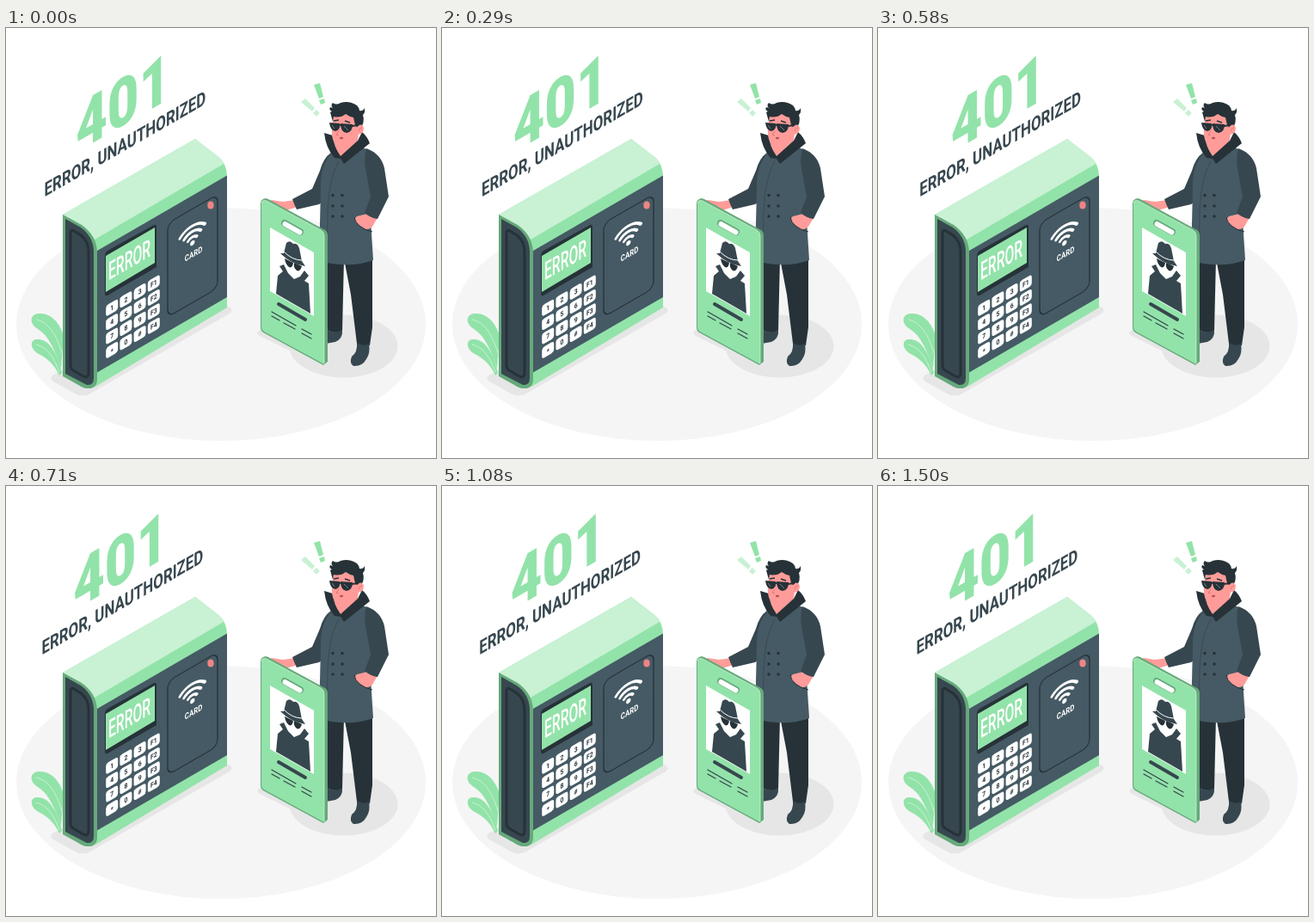
An HTML page with a canvas for the animation above (1.54 s loop, 500 px wide and 500 px high).

```html
<!DOCTYPE html>
<html lang="en">
<head>
<meta charset="utf-8">
<title>401</title>
<style>
html, body { margin: 0; width: 100%; height: 100%; overflow: hidden; background: #fff; }
canvas { display: block; width: 100vw; height: 100vh; }
</style>
</head>
<body>
<canvas id="stage" width="500" height="500"></canvas>
<script>
const ctx = document.getElementById('stage').getContext('2d');
const GREEN = '#92e3a9', PALE = '#c9f1d4', DEEP = '#66a97b';
const INK = '#263238', SLATE = '#37474f', COAT = '#455a64', SKIN = '#ff9c99', SHADE = '#e6e6e6';
const ISO = Math.tan(Math.PI / 6);
const LOOP = 1540, STEPS = 37;

// Horizontal shake offsets at every tenth of the cycle
const SHAKE = [0, -1, 2, -4, 4, -4, 4, -4, 2, -1, 0];

function fill(color, d) {
  ctx.fillStyle = color;
  ctx.fill(new Path2D(d));
}

function line(color, width, d) {
  ctx.strokeStyle = color;
  ctx.lineWidth = width;
  ctx.stroke(new Path2D(d));
}

function ellipse(color, x, y, rx, ry = rx, turn = 0) {
  ctx.fillStyle = color;
  ctx.beginPath();
  ctx.ellipse(x, y, rx, ry, turn, 0, Math.PI * 2);
  ctx.fill();
}

// Draws in an isometric wall plane whose origin is (x, y)
function onWall(x, y, squeeze, draw) {
  ctx.save();
  ctx.transform(squeeze, -squeeze * ISO, 0, 1, x, y);
  draw();
  ctx.restore();
}

function wallText(text, x, y, squeeze, weight, size, color, align = 'left') {
  onWall(x, y, squeeze, () => {
    ctx.font = `${weight} ${size}px Roboto, sans-serif`;
    ctx.textAlign = align;
    ctx.fillStyle = color;
    ctx.fillText(text, 0, 0);
  });
}

function roundBox(x, y, w, h, r) {
  ctx.beginPath();
  ctx.roundRect(x, y, w, h, r);
}

function drawFloor() {
  ellipse('#f5f5f5', 250, 344.5, 238, 135.5);
  ellipse(SHADE, 392.5, 370, 63, 36.5);
  fill(SHADE, 'M54 404Q50 408 55 411L80 425Q89 430 98 425L260 332Q265 328 260 325L230 310Z');
  fill(SHADE, 'M294 352Q290 355 295 358L366 393L374 389L300 350Z');
}

function drawLeaves() {
  fill(GREEN, 'M64 396C57 375 50 358 37 350C27 344 27 333 38 332C53 331 63 344 67 358Z');
  line(PALE, 1, 'M35 339C49 342 58 355 65 378');
  fill(GREEN, 'M62 404C56 391 48 384 38 379C28 374 27 362 36 362C50 361 60 378 65 401Z');
  line(PALE, 1, 'M35 368C48 371 56 383 62 400');
}

function drawKeypad() {
  const rows = [['1', '2', '3', 'F1'], ['4', '5', '6', 'F2'], ['7', '8', '9', 'F3'], ['*', '0', '#', 'F4']];
  rows.forEach((keys, row) => keys.forEach((key, col) => {
    const x = 123.2 + col * 16.2, y = 325.2 - col * 9.4 + row * 16.4;
    onWall(x, y, 1, () => {
      ctx.fillStyle = '#fff';
      roundBox(-7, -6.5, 14, 13, 3);
      ctx.fill();
    });
    wallText(key, x, y + (key === '*' ? 4.2 : 2.8), .85, 700, 8, INK, 'center');
  }));
}

function drawReader() {
  // shell
  fill(GREEN, 'M66 217L220 129L248 151Q257 158 257 174V325L104 417L92 419Z');
  fill(PALE, 'M66 217L220 129L245 148Q251 152 253 158L103 246Q98 237 90 232Z');
  fill(COAT, 'M106 259L257 171.5V313L106 400.5Z');
  // end cap
  fill(DEEP, 'M66 217L88 229Q105 241 106 260V408Q106 420 94 419Q90 419 84 415L66 405Z');
  fill(SLATE, 'M69 222L87 232Q101 242 102 259V407Q102 416 94 415L69 402Z');
  line(INK, 3, 'M75 238Q75 234 79 236L87 241Q96 248 96 260V400Q96 408 90 405L78 398Q75 396 75 392Z');
  // display
  fill(INK, 'M115 264Q115 261 118 259L172 229Q175 228 175 231V278L118 311Q115 312 115 309Z');
  fill(GREEN, 'M116 265L173 232V273L116 307Z');
  wallText('ERROR', 119, 293.5, .54, 500, 29, '#fff');
  drawKeypad();
  // card area
  onWall(188, 227, 1, () => {
    ctx.strokeStyle = INK;
    ctx.lineWidth = 1.3;
    roundBox(0, 0, 58, 109, 8);
    ctx.stroke();
  });
  ellipse('#ed8583', 238, 206, 3.7, 4.5);
  onWall(216.8, 248, 1, () => {
    ctx.strokeStyle = '#fff';
    ctx.lineWidth = 3.4;
    ctx.lineCap = 'round';
    for (const r of [7, 13.5, 20]) {
      ctx.beginPath();
      ctx.arc(0, 2, r, -Math.PI * .76, -Math.PI * .24);
      ctx.stroke();
    }
    ellipse('#fff', 0, 2, 2.7);
  });
  wallText('CARD', 218, 266, .78, 700, 10, '#fff', 'center');
}

function drawMan() {
  // legs and shoes
  fill(INK, 'M372 268H393L391 352Q382 357 373 351Z');
  fill(SLATE, 'M373 351Q382 356 391 351Q392 361 383 365L372 367Z');
  fill(INK, 'M393 268H426V348L423 369Q414 374 408 367L401 310Z');
  fill(SLATE, 'M408 366Q415 371 422 367Q424 378 419 385Q414 394 404 393Q399 390 402 382Q409 377 408 366Z');
  // far arm and hand
  fill(SKIN, 'M337 200L322 202L309 200Q305 201 309 205L318 212L326 212L339 208Z');
  fill(SLATE, 'M378 145Q369 151 365 166L356 187L333 199Q335 205 338 211L364 205Q374 200 378 185Z');
  // coat
  fill(COAT, 'M379 145L410 137L422 142Q430 151 426 176L423 207L427 270Q400 280 364 271L366 185Q365 161 379 145Z');
  line(SLATE, .8, 'M387 155Q375 175 374 215L373 272');
  // near arm
  fill(SKIN, 'M420 216L408 219Q404 222 407 226L414 232Q421 237 426 231L433 219Z');
  fill(SLATE, 'M419 140Q436 146 440 163L445 196L432 222Q424 221 417 215L424 196L420 174Q415 154 419 140Z');
  line(INK, 1, 'M405 220Q407 232 426 237');
  for (const y of [194.5, 207, 219]) {
    ellipse(INK, 380, y, 1.7);
    ellipse(INK, 391, y, 1.7);
  }
  // neck and collar
  fill(SKIN, 'M380 125L411 116L408 137L390 152L383 140Z');
  fill(INK, 'M370 122L380 125Q381 138 389 149L409 131L414 121Q420 126 423 134L393 158L389 152L382 151Q372 140 370 122Z');
  // head
  fill(SKIN, 'M381 102Q392 94 408 101L411 117Q407 126 397 131Q388 136 382 133Q378 129 379 114Z');
  fill(INK, 'M380 109L377 98L379 97Q375 95 377 92L380 93Q377 90 380 87Q384 90 389 87Q399 84 408 90Q411 93 411 96Q415 97 417 93Q418 98 415 101Q418 110 411 118L406 113L404 104Q399 103 395 100Q389 105 381 103Z');
  ellipse(SKIN, 411.5, 118, 4.3, 5.6, .35);
  line('#df706f', .8, 'M410 120Q411 116 414 116');
  line(INK, 1.5, 'M381 108L387 107M394 108L400 110');
  line(INK, 2.2, 'M378 112L402 114L410 113');
  fill(INK, 'M376 110L388 111Q389 119 383 120Q377 119 376 110ZM389 111L403 112Q403 121 396 122Q389 121 389 111Z');
  line('#718088', 1, 'M379 113L382 117M393 114L398 119');
  line('#df706f', .9, 'M387 120L384 124L387 125');
  ellipse('#b34e52', 390, 128, 2, 1.2);
}

function drawPass() {
  fill(DEEP, 'M296 204Q296 199 302 198L305 199L371 235Q374 237 374 241V388L369 392L299 354Q296 352 296 348Z');
  fill(GREEN, 'M297 204Q297 199 303 201L366 235Q370 237 370 242V391L300 353Q297 351 297 347Z');
  line(PALE, .8, 'M297 204Q298 199 303 201L366 235Q370 237 370 242V390');
  ctx.lineCap = 'round';
  line(DEEP, 8, 'M324 227L342 237');
  line('#fff', 6, 'M324.5 228L341.5 237.5');
  ctx.lineCap = 'butt';
  fill('#fff', 'M307 232L358 261V335L307 306Z');
  // portrait pictogram
  fill(SLATE, 'M314 309L316 288L322 283L318 277L323 275L328 285L335 292L342 289L347 282L352 288L347 294L352 297L354 332Z');
  fill('#fff', 'M325 269L344 279Q343 288 335 290Q327 285 325 269Z');
  fill(SLATE, 'M319 262L323 262L326 250Q330 246 334 251Q339 250 341 256L344 271L348 277Q332 275 319 262Z');
  line('#fff', 1, 'M323 260Q333 270 344 270');
  fill(INK, 'M324 268L334 273Q333 280 329 278Q325 275 324 268ZM335 273L344 277Q342 284 338 282Q334 279 335 273Z');
  ctx.lineCap = 'round';
  line(SLATE, 4, 'M317 321L348 339');
  line(SLATE, 1.3, 'M309 330L337 346M344 350L355 356M309 335L318 340M323 343L336 350M344 355L355 361');
  ctx.lineCap = 'butt';
}

function drawAlert() {
  fill(GREEN, 'M358 66L365 64L369 80L364 82ZM364 84L370 82L371 87L366 89Z');
  fill(PALE, 'M343 86L348 82L359 93L356 97ZM357 99L361 95L365 99L361 103Z');
}

function drawTitle(dx) {
  wallText('401', 81.4 + dx, 145, .81, 900, 78, GREEN);
  wallText('ERROR, UNAUTHORIZED', 44.8 + dx, 196.5, .75, 700, 22.5, SLATE);
}

function shakeAt(time) {
  const step = Math.floor(time / LOOP * STEPS + .1);
  const at = (step / 36 + .018) % 1 * 10;
  const i = Math.floor(at);
  return SHAKE[i] + (SHAKE[i + 1] - SHAKE[i]) * (at - i);
}

function render(time) {
  ctx.fillStyle = '#fff';
  ctx.fillRect(0, 0, 500, 500);
  drawFloor();
  drawLeaves();
  drawReader();
  drawMan();
  drawPass();
  drawAlert();
  drawTitle(shakeAt(time % LOOP));
}

const start = performance.now();

function tick() {
  render(performance.now() - start);
  requestAnimationFrame(tick);
}

tick();
</script>
</body>
</html>
```
